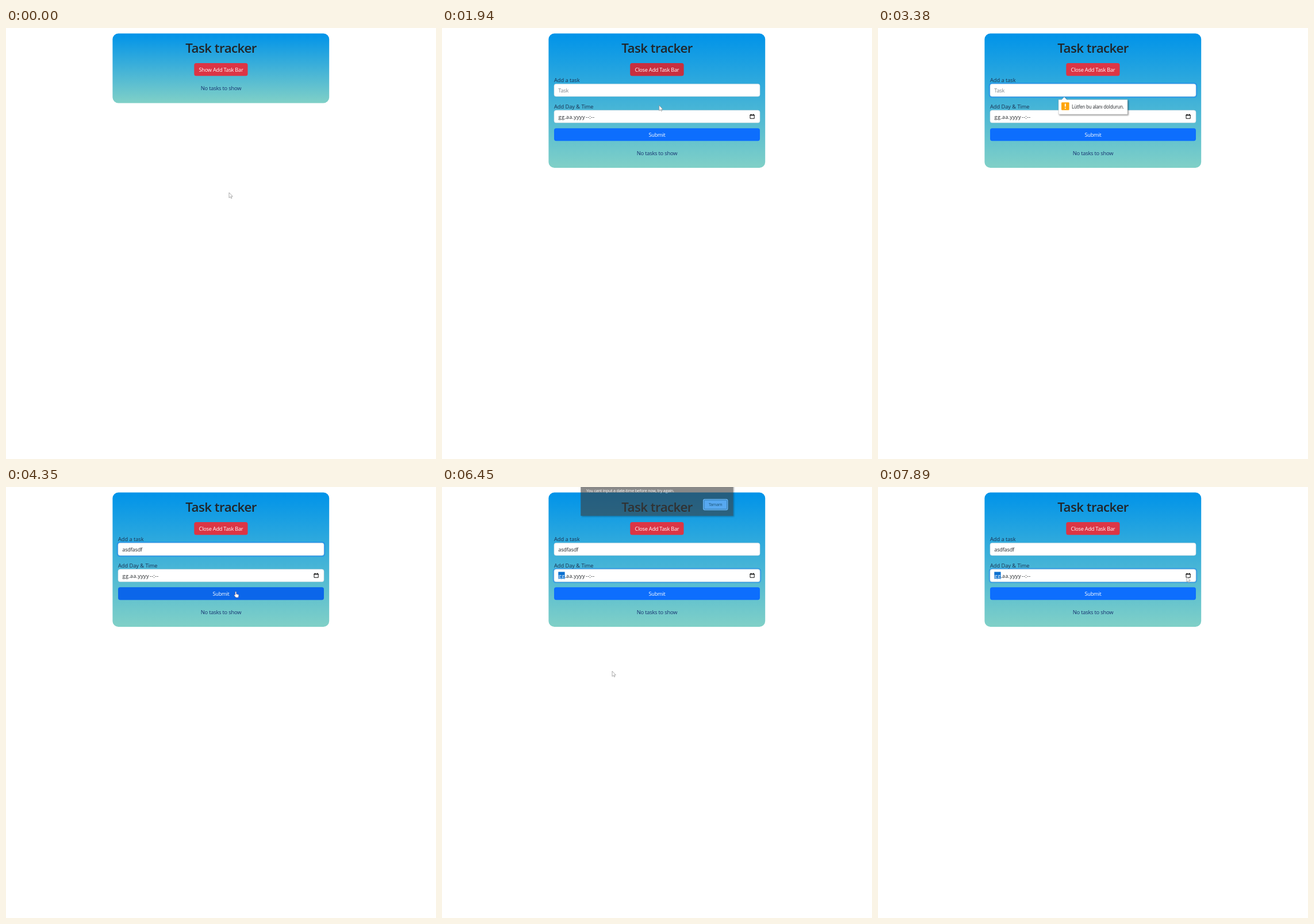
An HTML page that plays this animation: 748 by 749 pixels, repeating every 8000 ms.

```html
<!DOCTYPE html>
<html lang="en">
<head>
<meta charset="utf-8">
<title>Task tracker</title>
<style>
html, body { margin: 0; width: 100%; height: 100%; overflow: hidden; background: #fff; }
svg { display: block; width: 748px; height: 749px; }
text { font: 9.2px "Open Sans", "Noto Sans", sans-serif; letter-spacing: -.025em; fill: #212529; }
.mid { text-anchor: middle; }
.white { fill: #fff; }
.label { fill: #1a2f50; letter-spacing: 0; }
.ring { fill: none; stroke: #0d6efd; stroke-opacity: .35; stroke-width: 2.4; }
.field { fill: #fff; stroke: #ced4da; stroke-width: .6; }
.title { font-size: 22.4px; font-weight: 600; }
.date { letter-spacing: .25px; word-spacing: -1.5px; }
</style>
</head>
<body>
<svg viewBox="0 0 748 749">
  <defs>
    <linearGradient id="sky" x2="0" y2="1">
      <stop stop-color="#0093e9"/><stop offset="1" stop-color="#80d0c7"/>
    </linearGradient>
    <filter id="shadow" x="-20%" y="-40%" width="140%" height="200%">
      <feDropShadow dx="1.5" dy="1.5" stdDeviation="1.2" flood-opacity=".45"/>
    </filter>
    <g id="tip">
      <path d="M314 124.5H319.5L324 120L328.5 124.5H434V150H314Z" fill="#fff" stroke="#aaa"
        stroke-width=".5" stroke-linejoin="round" filter="url(#shadow)"/>
      <rect x="319" y="129.2" width="13.6" height="13.6" rx="1.2" fill="#ffa50a"/>
      <path d="M325.8 131.5v5.2m0 1.7v1.9" stroke="#fff" stroke-width="1.9"/>
      <text x="337" y="140" style="font-size:8.1px">Lütfen bu alanı doldurun.</text>
    </g>
  </defs>

  <rect id="card" x="185.4" y="9.5" width="376.8" height="121" rx="10" fill="url(#sky)"/>
  <text class="mid title" x="374" y="43">Task tracker</text>
  <rect x="327.3" y="61" width="93.2" height="22.3" rx="3.6" fill="#dc3545"/>
  <rect id="toggleHover" x="327.3" y="61" width="93.2" height="22.3" rx="3.6" fill="#b52b3a"/>
  <text id="toggle" class="mid white" x="374" y="76"></text>

  <g id="form">
    <text class="label" x="195" y="94">Add a task</text>
    <rect id="taskRing" class="ring" x="194" y="96.2" width="360" height="23.8" rx="4"/>
    <rect class="field" x="195" y="97.2" width="358" height="21.8" rx="3.5"/>
    <text id="task" x="202.3" y="112.3"></text>

    <text class="label" x="195" y="139.5">Add Day &amp; Time</text>
    <rect id="dateRing" class="ring" x="194" y="141.9" width="360" height="23.8" rx="4"/>
    <rect class="field" x="195" y="142.9" width="358" height="21.8" rx="3.5"/>
    <rect id="mark" x="202.3" y="147.5" width="11.3" height="12.5" fill="#0a70d0"/>
    <text class="date" x="202.6" y="158"><tspan id="day">gg</tspan>.aa.yyyy --:--</text>
    <path d="M536 151h7.2v6.3h-7.2z" fill="none" stroke="#111"/>
    <path d="M535.5 151.6h8.2M537.5 149.5v2M541.7 149.5v2" stroke="#111" stroke-width="1.3"/>

    <rect x="195" y="174.3" width="358" height="21.9" rx="3.6" fill="#0d6efd"/>
    <rect id="submitHover" x="195" y="174.3" width="358" height="21.9" rx="3.6" fill="#0b5ed7"/>
    <text class="mid white" x="374" y="189.2">Submit</text>
  </g>

  <text id="empty" class="mid" x="374" style="font-size:9.4px;fill:#16306e">No tasks to show</text>
  <use id="taskTip" href="#tip"/>
  <use id="dateTip" href="#tip" y="45.5"/>

  <g id="alert">
    <path d="M241.3 -40h265.2v90h-265.2z" fill="#3b3b3b" filter="url(#shadow)"/>
    <text class="white" x="251" y="9" style="font-size:7.15px">You cant input a date-time before now, try again.</text>
    <rect x="454.5" y="21.3" width="42.5" height="18.6" rx="2" fill="#8ab4f8" stroke="#a9cbff"/>
    <rect x="456" y="22.8" width="39.5" height="15.6" rx="1" fill="none" stroke="#3b5570" stroke-width=".7"/>
    <text class="mid" x="475.7" y="33.2" style="font-size:7.1px">Tamam</text>
  </g>

  <g id="cursor" fill="#fff" stroke="#888" stroke-width=".7" stroke-linejoin="round">
    <path id="arrow" d="M0 0V9.2L2.2 7.3L3.6 10.2L5 9.5L3.7 6.7H6.3Z"/>
    <path id="hand" stroke="#844" stroke-width=".4" d="M-1.2 .5Q-.3 -1 .6 .5V4L4.2 5Q5 5.3 4.8 6.5L4 10H0L-3 6.5Q-3.3 5.2-2.2 5.2L-1.2 6.2Z"/>
  </g>
</svg>
<script>
const LOOP = 8000, STEP = 160;
const $ = id => document.getElementById(id);
const clamp = v => Math.min(1, Math.max(0, v));
const within = (t, a, b) => t >= a && t < b;
const fade = (id, v) => { $(id).style.opacity = Number(v); };

// The screen refreshes in even steps, counted anew after each pause.
const resumes = [0, 1450, 1780, 4030, 6450];
const tick = t => {
  const from = resumes.findLast(r => r <= t);
  return from + Math.floor((t - from) / STEP) * STEP;
};

// Where the cursor rests; it eases out from one stop to the next.
const stops = [
  { from: 0, to: 160, x: 388, y: 286 },
  { from: 800, to: 1780, x: 370, y: 75 },
  { from: 2260, to: 2740, x: 384, y: 182 },
  { from: 4030, to: 4030, x: 430, y: 108 },
  { from: 4350, to: 4510, x: 400, y: 182 },
  { from: 4990, to: 5150, x: 536, y: 154 },
  { from: 5790, to: 6449, x: 390, y: 238 },
  { from: 6450, to: 6450, x: 296, y: 320 },
  { from: 7090, to: 7410, x: 478, y: 27 },
  { from: 7890, to: LOOP, x: 537, y: 156 }
];
function cursorAt(t) {
  const i = stops.findLastIndex(s => s.from <= t);
  const a = stops[i], b = stops[i + 1] || a;
  const p = t <= a.to ? 0 : 1 - (1 - (t - a.to) / (b.from - a.to)) ** 2;
  return { x: a.x + (b.x - a.x) * p, y: a.y + (b.y - a.y) * p };
}

const isOpen = t => t >= 960 && !within(t, 1450, 1780);
const isHidden = t => within(t, 2740, 4030);
function over(t, left, top, right, bottom) {
  const { x, y } = cursorAt(t);
  return !isHidden(t) && within(x, left, right) && within(y, top, bottom);
}
const overToggle = t => over(t, 327, 61, 420, 83);
const overSubmit = t => isOpen(t) && over(t, 195, 174, 553, 196);

// Button colours follow the cursor over two steps.
const hover = (test, t) => (test(t) + test(Math.max(0, t - STEP))) / 2;
const popup = (t, start, end, first = 0) =>
  t < start ? 0 : clamp(first + (t - start) / (2 * STEP)) * clamp((end - t) / STEP);

function draw(t) {
  const open = isOpen(t), dateFocus = t >= 4510;
  const typed = "asdfasdf".slice(0, Math.max(0, Math.floor((t - 3380) / 40)));

  $("card").setAttribute("height", open ? 233.5 : 121);
  $("empty").setAttribute("y", open ? 221.2 : 108.2);
  $("toggle").textContent = (open ? "Close" : "Show") + " Add Task Bar";
  fade("form", open);
  $("task").textContent = typed || "Task";
  $("task").style.fill = typed ? "#212529" : "#7b838a";
  fade("taskRing", within(t, 2740, 4510));
  fade("dateRing", dateFocus);
  fade("mark", dateFocus);
  $("day").style.fill = dateFocus ? "#fff" : "#212529";

  fade("toggleHover", hover(overToggle, t));
  fade("submitHover", hover(overSubmit, t));
  fade("taskTip", popup(t, 2740, 3540));
  fade("dateTip", popup(t, 4510, 5310));
  fade("alert", popup(t, 6450, 7410, .6));

  const { x, y } = cursorAt(t), hand = overToggle(t) || overSubmit(t);
  $("cursor").setAttribute("transform", `translate(${x} ${y})`);
  fade("cursor", !isHidden(t));
  fade("arrow", !hand);
  fade("hand", hand);
}

function frame() {
  draw(tick(performance.now() % LOOP));
  requestAnimationFrame(frame);
}
frame();
</script>
</body>
</html>
```
